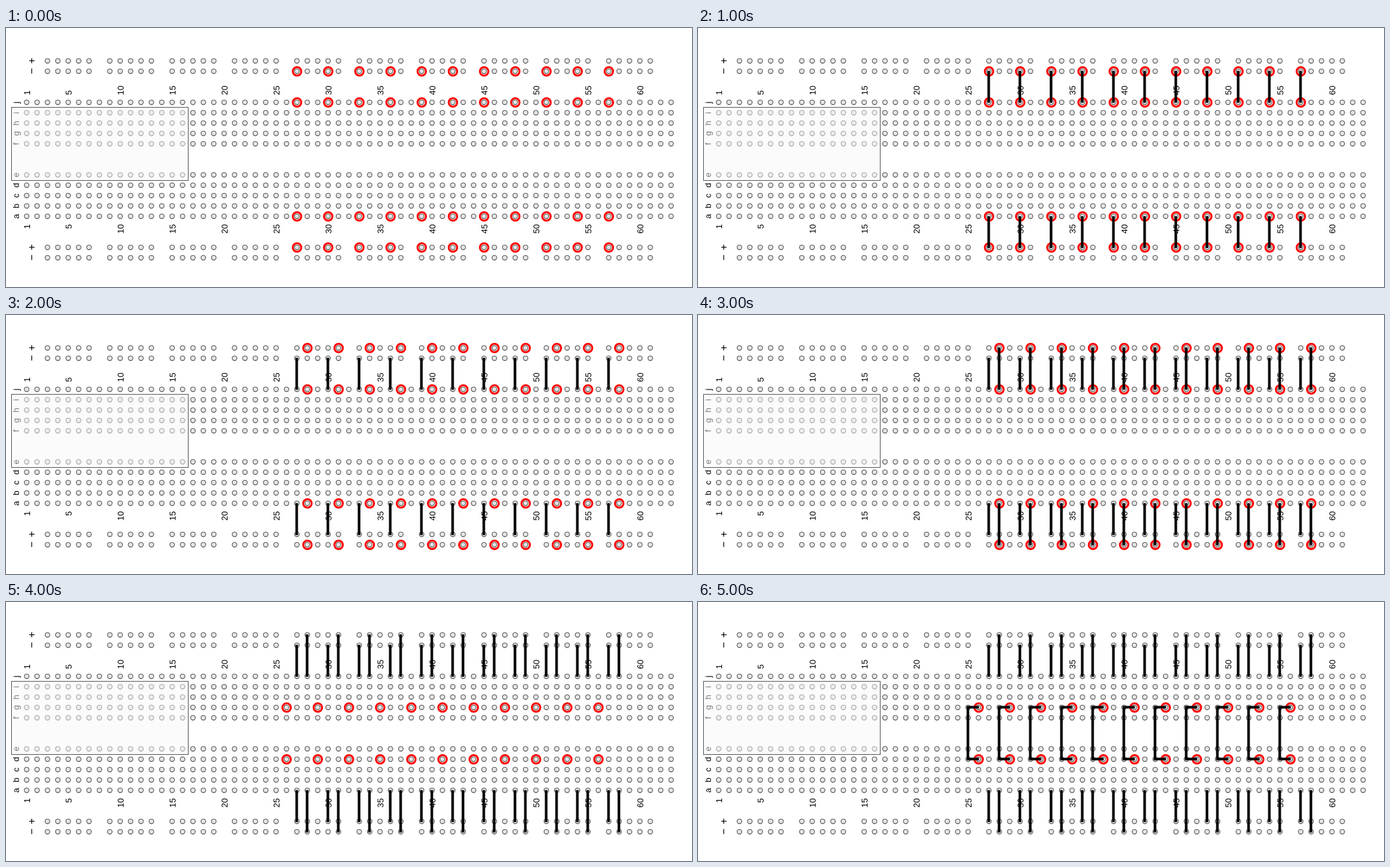
Recreate the animation shown at these times as an HTML page. Size 1056 px wide and 400 px high, loop 6000 ms.

```html
<!DOCTYPE html>
<html lang="en">
<head>
<meta charset="utf-8">
<title>Breadboard wiring steps</title>
<style>
  html, body { margin: 0; width: 100%; height: 100%; overflow: hidden; background: #fff; }
  svg { display: block; }
  text { font: 13px "Liberation Sans", Arial, sans-serif; }
  .hole { fill: #e6e6e6; stroke: #555; stroke-width: 1.1; }
  .ring { fill: none; stroke: #f00; stroke-width: 3; }
  .wire { fill: none; stroke: #000; stroke-width: 4; }
</style>
</head>
<body>
<svg id="board" width="1056" height="400" viewBox="0 0 1056 400"></svg>
<script>
const board = document.getElementById('board');
const rowY = { j: 115, i: 131, h: 147, g: 163, f: 179, e: 227, d: 243, c: 259, b: 275, a: 291 };
const railY = [51, 67, 339, 355];
const colX = n => 16 + 16 * n;

function add(parent, tag, attrs, content = '') {
  const el = document.createElementNS('http://www.w3.org/2000/svg', tag);
  for (const key in attrs) el.setAttribute(key, attrs[key]);
  el.textContent = content;
  return parent.appendChild(el);
}
const group = () => add(board, 'g', {});
const hole = (x, y) => add(board, 'circle', { class: 'hole', cx: x - 0.2, cy: y - 0.2, r: 3.6 });
const label = (s, x, y, anchor = 'middle', size = 13) => add(board, 'text', {
  transform: `translate(${x} ${y}) rotate(-90)`, 'text-anchor': anchor, style: `font-size:${size}px`
}, s);

// Terminal strips and power rails
for (const row in rowY) {
  label(row, 20, rowY[row]);
  for (let n = 1; n <= 63; n++) hole(colX(n), rowY[row]);
}
railY.forEach((y, k) => {
  label(k % 2 ? '−' : '+', 45, y - 0.5, 'middle', 16);
  for (let n = 3; n <= 61; n++) if (n % 6 !== 2) hole(colX(n), y);
});
for (let n = 0; n <= 60; n += 5) {
  const col = n || 1;
  label(col, colX(col) + 4.5, 103.5, 'start');
  label(col, colX(col) + 4.5, 303, 'end');
}
add(board, 'rect', {
  x: 8.5, y: 122.5, width: 272, height: 113, fill: '#f8f8f8', 'fill-opacity': 0.5, stroke: '#555'
});

// Each stage rings the holes first, then runs wires between them
const stages = [
  { col: 27, ends: [67, 115, 291, 339], path: 'M0 66V115.5M0 290.5V340' },
  { col: 28, ends: [51, 115, 291, 355], path: 'M0 50V115.5M0 290.5V356' },
  { col: 26, ends: [163, 243], path: 'M17 162.5H0V242.5H17', shift: -16 }
].map(({ col, ends, path, shift = 0 }) => {
  const rings = group(), wires = group();
  for (let k = 0; k < 11; k++) {
    const x = colX(col + 3 * k);
    for (const y of ends) add(rings, 'circle', { class: 'ring', cx: x, cy: y, r: 6.5 });
    add(wires, 'path', { class: 'wire', d: path, transform: `translate(${x + shift - 0.5} 0)` });
  }
  return { rings, wires };
});

const show = (el, on) => el.setAttribute('visibility', on ? 'visible' : 'hidden');
const start = performance.now();
function draw() {
  const step = Math.floor((performance.now() - start) / 1000) % 6;
  stages.forEach(({ rings, wires }, k) => {
    show(rings, step >> 1 === k);
    show(wires, step > 2 * k);
  });
  requestAnimationFrame(draw);
}
draw();
</script>
</body>
</html>
```
